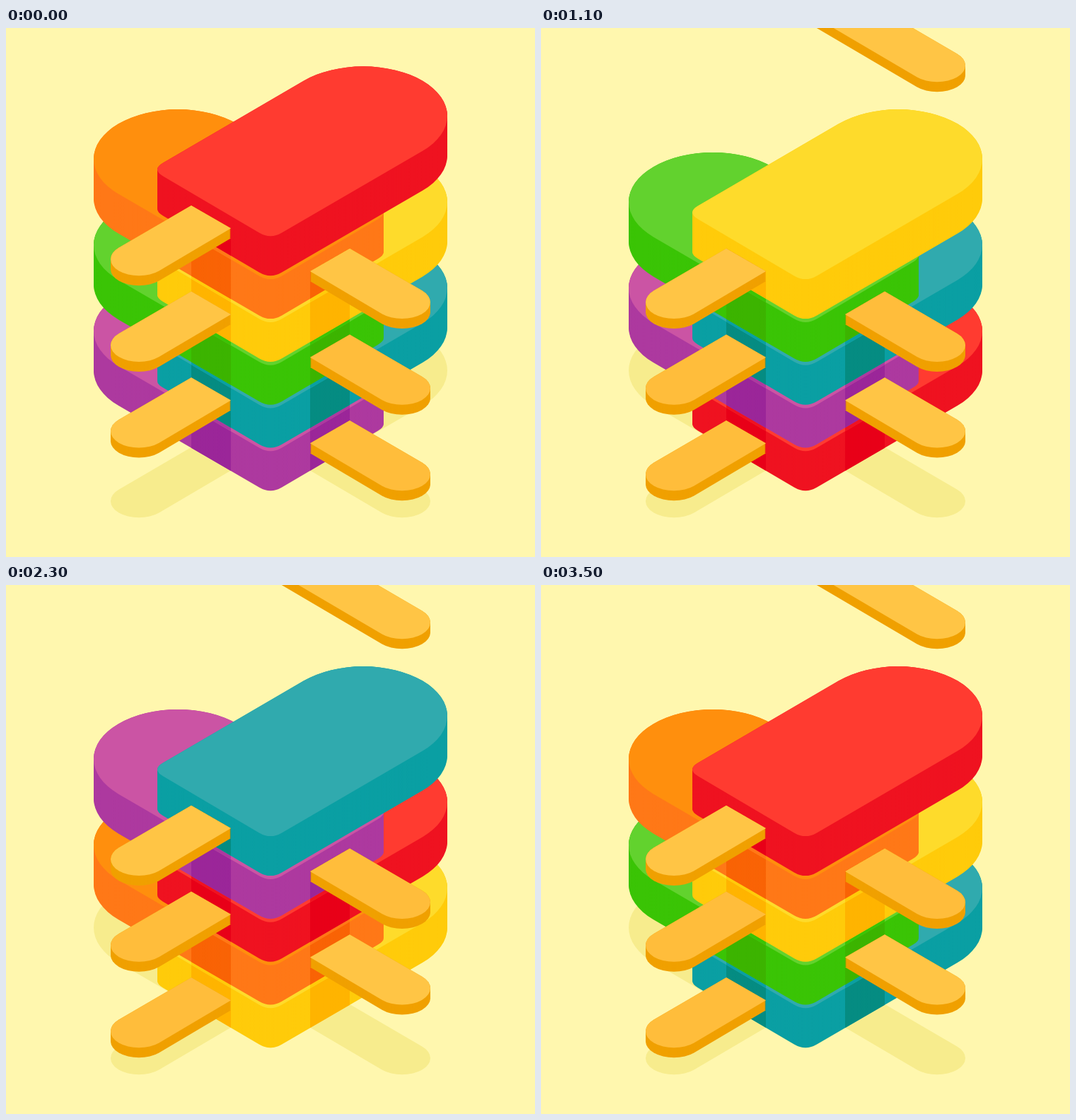
Write an HTML page with a canvas that moves like this. It is 748 by 748 pixels and loops after 3.6 s.

```html
<!DOCTYPE html>
<html lang="en">
<head>
<meta charset="utf-8">
<title>Ice pop stack</title>
<style>
  html, body { margin: 0; width: 100%; height: 100%; overflow: hidden; background: #fff7ae; }
  canvas { display: block; }
</style>
</head>
<body>
<canvas id="stage" width="748" height="748"></canvas>
<script>
const ctx = document.getElementById('stage').getContext('2d');
const SIZE = 748, GAP = 60.8, THICK = 56, SLOPE = 0.585;

// top, side, shaded side
const FLAVOURS = [
  ['#ff3b30', '#ef1220', '#e80018'],
  ['#ff8f0d', '#ff7817', '#f96305'],
  ['#fedb2b', '#ffcb0a', '#ffb400'],
  ['#62d22e', '#3ac405', '#3cb400'],
  ['#30aaae', '#0a9fa3', '#058c82'],
  ['#cb54a4', '#ad399f', '#9b2699']
];

// All shapes have the head at the right; the other direction is mirrored.
const body = new Path2D();
body.ellipse(505, 124.3, 119, 70, 0, -Math.PI * 0.75, Math.PI * 0.25);
body.lineTo(390, 289.6);
body.quadraticCurveTo(374, 299, 358, 289.6);
body.lineTo(222, 209.4);
body.quadraticCurveTo(206, 200, 222, 190.7);
body.closePath();

function makeStick(inner) {
  const p = new Path2D();
  p.moveTo(262 + inner, 251 - inner * SLOPE);
  p.lineTo(318 + inner, 283.3 - inner * SLOPE);
  p.ellipse(188, 327, 40, 23.3, 0, Math.PI * 0.25, Math.PI * 1.25);
  p.closePath();
  return p;
}
const stick = makeStick(0), bareStick = makeStick(130);

// Region left over after a bite, slid along the pop's axis by dx.
function makeBite(dx) {
  const dy = -dx * SLOPE, p = new Path2D();
  const q = (a, b, x, y) => p.quadraticCurveTo(a + dx, b + dy, x + dx, y + dy);
  p.moveTo(-100, -200);
  p.lineTo(394 + dx, -200);
  p.lineTo(394 + dx, 90 + dy);
  q(419, 112, 446, 89);
  q(454, 100, 469, 101);
  q(457, 122, 475, 148);
  q(451, 176, 475, 203);
  q(457, 224, 467, 247);
  p.lineTo(467 + dx, 900);
  p.lineTo(-100, 900);
  p.closePath();
  return p;
}
const bites = [null, makeBite(72), makeBite(0), makeBite(-75)];

function at(y, draw) {
  ctx.save();
  ctx.translate(0, y);
  draw();
  ctx.restore();
}

function fillAt(shape, color, y, cut) {
  at(y, () => {
    if (cut) ctx.clip(cut);
    ctx.fillStyle = color;
    ctx.fill(shape);
  });
}

function sweep(shape, color, height, cut) {
  for (let y = height; y >= 0; y -= 2) fillAt(shape, color, y, cut);
}

function drawStick(shape, dark) {
  sweep(shape, '#f0a000', 14);
  fillAt(shape, dark ? '#ffbd3b' : '#ffc545', 0);
}

// Vertical band below a stick; far selects the opposite face.
function inBand(far, top, draw) {
  const x = v => far ? SIZE - v : v;
  ctx.save();
  ctx.beginPath();
  ctx.moveTo(x(262), top);
  ctx.lineTo(x(318), top + 32.5);
  ctx.lineTo(x(318), 450);
  ctx.lineTo(x(262), 450);
  ctx.clip();
  draw();
  ctx.restore();
}

function drawPop([top, side, shade], cut, nearShaded, farShaded) {
  sweep(body, side, THICK, cut);
  const darken = () => sweep(body, shade, THICK, cut);
  inBand(false, nearShaded ? 221 : 251, darken);
  if (farShaded) inBand(true, 221, darken);
  fillAt(body, top, 0, cut);
  const rim = () => fillAt(body, side, 0, cut);
  if (nearShaded) inBand(false, 221, rim);
  if (farShaded) inBand(true, 221, rim);
}

function facing(flip, draw) {
  ctx.save();
  if (flip) {
    ctx.translate(SIZE, 0);
    ctx.scale(-1, 1);
  }
  draw();
  ctx.restore();
}

function drawGroundShadow() {
  const ground = 5 * GAP + THICK;
  for (const flip of [false, true]) facing(flip, () => {
    fillAt(body, '#f7ec8d', ground);
    fillAt(bareStick, '#f7ec8d', ground - 18);
  });
}

function render(time) {
  const step = Math.floor(time % 3600 / 100);
  const turn = Math.floor(step / 6), phase = step % 6;
  const eaten = phase > 3;
  ctx.fillStyle = '#fff7ae';
  ctx.fillRect(0, 0, SIZE, SIZE);
  drawGroundShadow();

  const stickAbove = (slot, distance) => slot > distance || slot === distance && !eaten;
  for (let slot = 5; slot >= 0; slot--) {
    const index = (turn + slot) % 6, flip = index % 2 === 1;
    facing(flip, () => at(slot * GAP, () => {
      if (slot === 0 && eaten) {
        const lift = ((phase - 3) / 2) ** 2 * 274;
        at(-lift, () => drawStick(bareStick, false));
        return;
      }
      const cut = slot === 0 ? bites[phase] : null;
      if (cut) drawStick(bareStick, false);
      drawPop(FLAVOURS[index], cut, stickAbove(slot, 2), stickAbove(slot, 1));
      drawStick(stick, slot === 3 || slot === 5 || slot === 2 && flip);
    }));
  }
}

const start = performance.now();
function tick() {
  render(performance.now() - start);
  requestAnimationFrame(tick);
}
tick();
</script>
</body>
</html>
```
